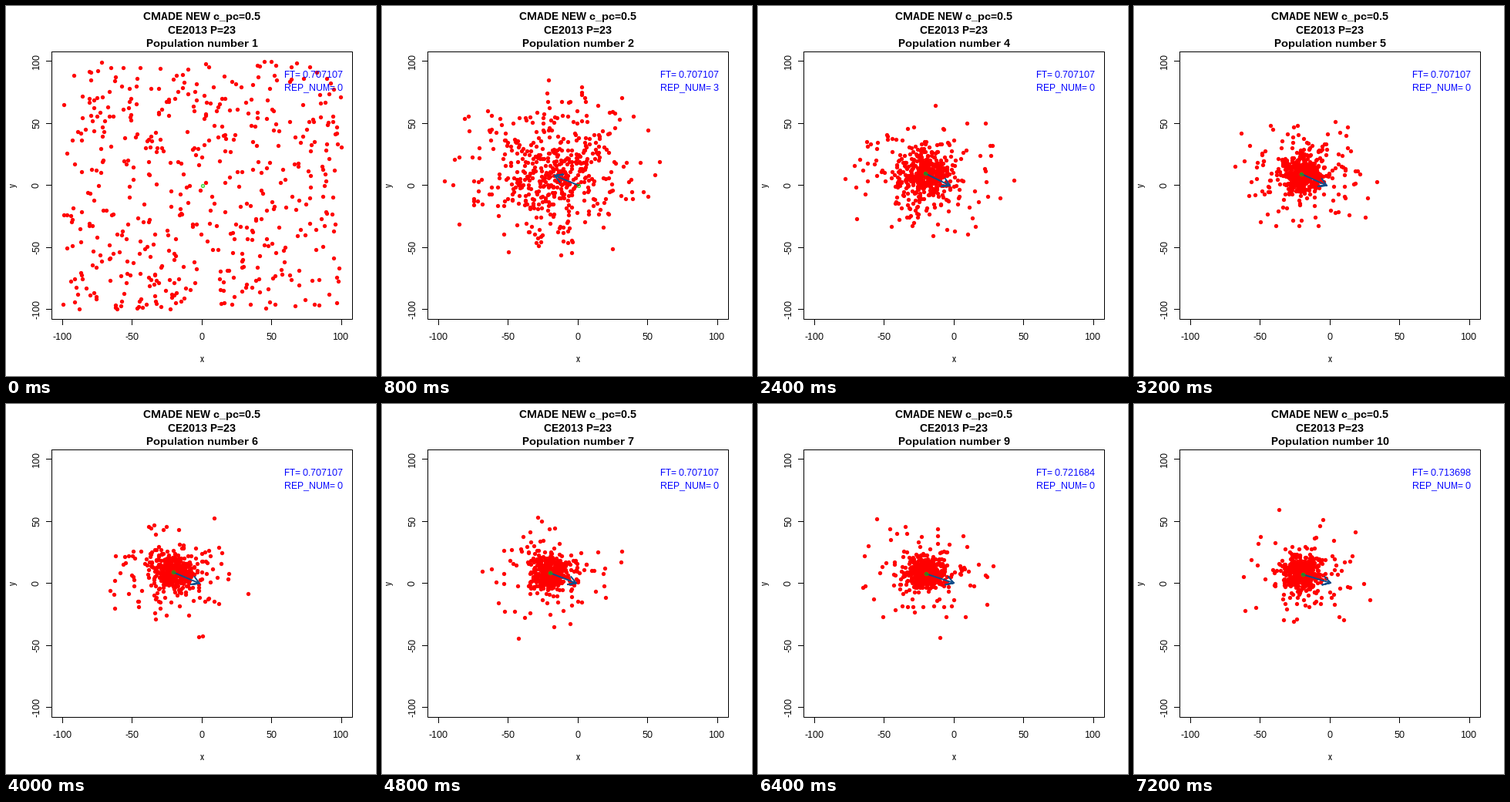
Write a matplotlib script that moves like this. It is 480 px wide and 480 px high and loops after 8 s.

```python
import math

import matplotlib.pyplot as plt
import numpy as np
from matplotlib.animation import FuncAnimation

SIZE, DPI = 480, 96
COUNT, GENERATIONS = 500, 10
RED, GREEN, BLUE, ARROW = "#ff0000", "#00cd00", "#0000ff", "#104e8b"
HEAD = 11  # arrow head length in pixels

# Plot region in pixels; both axes span -108 to 108.
LEFT, RIGHT, TOP, BOTTOM = 59.04, 449.76, 59.04, 406.56
SPAN = 216
TICK = 7

FT = {7: 0.73092, 8: 0.721684, 9: 0.713698}
REPEATS = {1: 3}

# Arrow ends at a few key generations, in pixels.
KEYS = [0, 1, 2, 3, 9]
START_X, START_Y = [254.5, 254.5, 224, 216.5, 218.5], [232.5, 232.5, 219, 217, 221]
TIP_X, TIP_Y = [254.5, 224, 239, 249, 255], [232.5, 220, 225.5, 233, 232]

plt.rcParams.update({
    "font.family": "Liberation Sans",
    "text.hinting": "native",
    "text.hinting_factor": 1,
})


def px(x):
    return (LEFT + RIGHT) / 2 + x * (RIGHT - LEFT) / SPAN


def py(y):
    return (TOP + BOTTOM) / 2 - y * (BOTTOM - TOP) / SPAN


def pt(pixels):
    return pixels * 72 / DPI


def cloud(gen):
    """Pixel positions of one generation: uniform first, then contracting."""
    rng = np.random.default_rng(40 + gen)
    if gen == 0:
        x, y = rng.uniform(-100, 100, (2, COUNT))
        return px(x), py(y)
    decay = math.exp(-(gen - 1) / 1.5)
    core, outer = 11.5 + 17 * decay, 37 + 15 * decay
    share = 0.8 - 0.55 * math.exp(-(gen - 1) / 2)
    spread = np.where(rng.random(COUNT) < share, core, outer)
    dx, dy = rng.normal(size=(2, COUNT)) * spread
    near = np.hypot(dx, dy) < 2.8 * outer
    return 217 + 5 * decay + dx[near], 219 - 4 * decay + 0.89 * dy[near]


def arrow_ends(gen):
    x0, y0, x1, y1 = (np.interp(gen, KEYS, values)
                      for values in (START_X, START_Y, TIP_X, TIP_Y))
    return (x0, y0), (x1, y1)


def arrow_path(start, tip):
    """Shaft and open head as a single polyline."""
    if start == tip:
        return [], []
    back = math.atan2(start[1] - tip[1], start[0] - tip[0])
    left, right = [(tip[0] + HEAD * math.cos(back + turn),
                    tip[1] + HEAD * math.sin(back + turn))
                   for turn in (-math.pi / 6, math.pi / 6)]
    return np.transpose([start, tip, left, tip, right])


fig = plt.figure(figsize=(SIZE / DPI, SIZE / DPI), dpi=DPI, facecolor="white")
ax = fig.add_axes([0, 0, 1, 1])
ax.set_xlim(0, SIZE)
ax.set_ylim(SIZE, 0)
ax.axis("off")


def label(x, y, text="", size=12, **style):
    return ax.text(x, y, text, fontsize=pt(size), ha="center", va="baseline",
                   rotation_mode="anchor", **style)


def rule(xs, ys):
    """Thin black line on whole pixels."""
    ax.plot(np.floor(xs), np.floor(ys), color="black", lw=pt(1),
            solid_capstyle="projecting", solid_joinstyle="miter")


def marker(color, size, **style):
    return ax.plot([], [], "o", color=color, ms=pt(size), **style)[0]


rule([LEFT, RIGHT, RIGHT, LEFT, LEFT], [TOP, TOP, BOTTOM, BOTTOM, TOP])
for value in range(-100, 101, 50):
    rule([px(value)] * 2, [BOTTOM, BOTTOM + TICK])
    rule([LEFT - TICK, LEFT], [py(value)] * 2)
    label(px(value) - 0.5, 433, str(value))
    label(43, py(value), str(value), rotation=90)
label(254, 462, "x")
label(13, 232.5, "y", rotation=90)

label(254, 18, "CMADE NEW c_pc=0.5", 14, weight="bold")
label(254, 36, "CE2013 P=23", 14, weight="bold")
title = label(254, 53, size=14, weight="bold")
ft_text = label(399, 93, color=BLUE, zorder=6)
rep_text = label(399, 109, color=BLUE, zorder=6)

dots = marker(RED, 5.3, mew=0, zorder=3)
arrow, = ax.plot([], [], color=ARROW, lw=pt(2), solid_capstyle="round",
                 solid_joinstyle="round", zorder=4)
ring = marker(GREEN, 4.2, mfc="none", mew=pt(0.9), zorder=5)
center = marker(GREEN, 1.5, mew=0, zorder=5)

clouds = [cloud(gen) for gen in range(GENERATIONS)]


def update(gen):
    start, tip = arrow_ends(gen)
    dots.set_data(*clouds[gen])
    arrow.set_data(*arrow_path(start, tip))
    for mark in (ring, center):
        mark.set_data([start[0]], [start[1]])
    title.set_text(f"Population number {gen + 1}")
    ft_text.set_text(f"FT= {FT.get(gen, math.sqrt(0.5)):.6g}")
    rep_text.set_text(f"REP_NUM= {REPEATS.get(gen, 0)}")
    return dots, arrow, ring, center, title, ft_text, rep_text


anim = FuncAnimation(fig, update, frames=GENERATIONS, interval=800,
                     init_func=lambda: update(0), repeat=True, repeat_delay=0)
plt.show()
```
